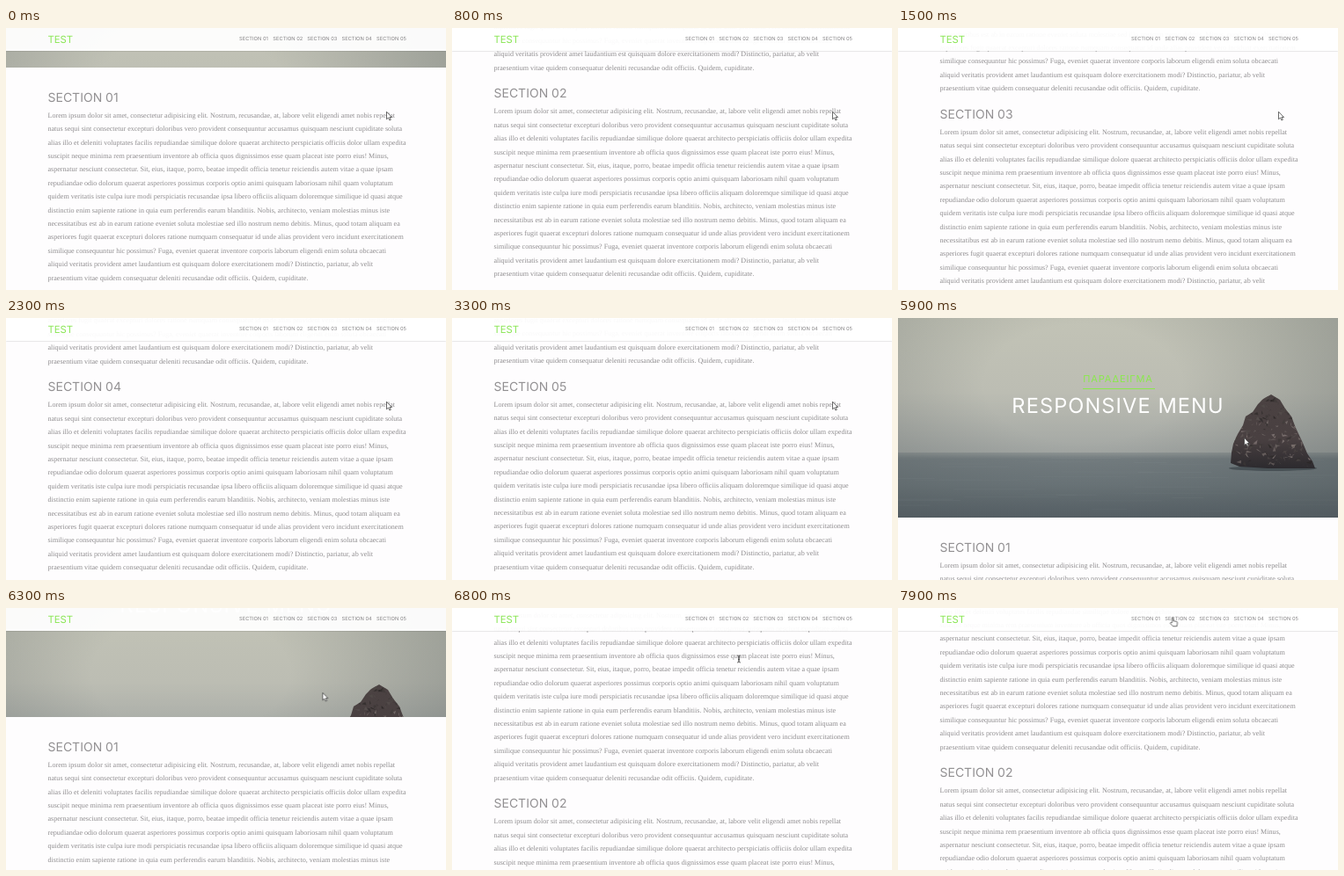
Animation of 500 by 298 pixels, one loop 8 s. Source, as an HTML page:

```html
<!DOCTYPE html>
<html lang="en">
<head>
<meta charset="utf-8">
<title>Responsive menu</title>
<style>
@property --scroll { syntax: "<number>"; inherits: true; initial-value: 182; }

html, body { margin: 0; width: 100%; height: 100%; overflow: hidden; background: #fefdfe; }
#stage {
  position: relative; width: 500px; height: 298px; overflow: hidden;
  background: #fefdfe; text-rendering: geometricPrecision;
  font-family: Inter, sans-serif;
  animation: scroll 8s infinite cubic-bezier(.3, 0, .3, 1);
}
#stage div { position: absolute; white-space: nowrap; }

#scene { left: 0; top: 0; width: 500px; height: calc(max(0, 226.7 - var(--scroll)) * 1px); overflow: hidden; }
#scene svg { display: block; }

#page { left: 0; top: 0; width: 500px; transform: translateY(calc(var(--scroll) * -1px)); }
#page .kicker, #page .title { left: 0; width: 500px; text-align: center; }
#page .kicker { top: 58.5px; font-size: 11px; line-height: 20px; letter-spacing: .9px; color: #8ae94c; }
#page .rule { left: 210px; top: 80px; width: 82px; height: 1.2px; background: #8ae94c; }
#page .title { top: 85px; font-size: 23.6px; line-height: 30px; letter-spacing: 1.1px; color: #fff; }
#page section { position: absolute; left: 47.5px; }
#page h2 { margin: 0; font-size: 14px; line-height: 20px; font-weight: 400; color: #929092; }
#page p { margin: 2px 0 0; font: 8.08px/15.4px "Liberation Serif", serif; color: #8f8d8f; white-space: pre; }

#nav {
  left: 0; top: 0; width: 500px; height: 26px; background: rgba(255, 255, 255, .95);
  box-shadow: 0 .5px 1.5px rgba(0, 0, 0, .22);
  opacity: clamp(0, (var(--scroll) - 40) / 50, 1);
}
#nav div { top: 3.4px; line-height: 20px; font-size: 5.75px; color: #858385; }
#nav .brand { left: 47.5px; font-size: 11.3px; color: #8ae655; }

#cursor { left: -8px; top: -8px; width: 16px; height: 16px; animation: move 8s infinite ease-in-out; }
#cursor svg { position: absolute; inset: 0; fill: #fff; stroke: #444; stroke-width: .8; stroke-linejoin: round; }
#arrow { animation: arrow 8s infinite step-end; }
#beam { animation: beam 8s infinite step-end; }
#hand { animation: hand 8s infinite step-end; }

@keyframes scroll {
  0%, .6% { --scroll: 182; }
  7.5%, 9.4% { --scroll: 417; }
  18.75% { --scroll: 632; }
  20% { --scroll: 633; }
  28.75%, 33% { --scroll: 886.5; }
  41.25%, 60.6% { --scroll: 1121.5; }
  70% { --scroll: 0; }
  73.75% { --scroll: 0; animation-timing-function: cubic-bezier(.4, 0, .6, .9); }
  85% { --scroll: 272.5; animation-timing-function: ease-out; }
  88% { --scroll: 289; }
  96.25% { --scroll: 289; animation-timing-function: ease-in; }
  98.75% { --scroll: 307.5; animation-timing-function: linear; }
  100% { --scroll: 334; }
}
@keyframes move {
  0%, 41.25% { transform: translate(435px, 100px); }
  43.75% { transform: translate(484px, 118px); }
  55% { transform: translate(484px, 282px); }
  57.5%, 61% { transform: translate(486px, 286px); }
  70%, 72.5% { transform: translate(399px, 146px); }
  73.75% { transform: translate(396px, 141px); }
  84%, 86% { transform: translate(326px, 58px); }
  92.5%, 100% { transform: translate(313.5px, 16px); }
}
@keyframes arrow { 0% { opacity: 1; } 81.25%, 100% { opacity: 0; } }
@keyframes beam { 0% { opacity: 0; } 81.25% { opacity: 1; } 91.25%, 100% { opacity: 0; } }
@keyframes hand { 0% { opacity: 0; } 91.25%, 100% { opacity: 1; } }
</style>
</head>
<body>
<div id="stage">
  <div id="scene">
    <svg width="500" height="298" viewBox="0 0 500 298">
      <defs>
        <linearGradient id="sky" x2="0" y2="1">
          <stop offset="0" stop-color="#c2c3b6"/>
          <stop offset=".55" stop-color="#bcbdb3"/>
          <stop offset="1" stop-color="#a2a6a3"/>
        </linearGradient>
        <linearGradient id="sea" x2="0" y2="1">
          <stop offset="0" stop-color="#8f9594"/>
          <stop offset=".05" stop-color="#747d80"/>
          <stop offset=".25" stop-color="#6d777b"/>
          <stop offset=".5" stop-color="#5a646a"/>
          <stop offset="1" stop-color="#4b565c"/>
        </linearGradient>
        <radialGradient id="vignette" cx=".42" cy=".25" r=".75">
          <stop offset=".3" stop-color="#444c4e" stop-opacity="0"/>
          <stop offset="1" stop-color="#444c4e" stop-opacity=".38"/>
        </radialGradient>
        <linearGradient id="stone" x2="0" y2="1">
          <stop offset="0" stop-color="#4b4242"/>
          <stop offset=".6" stop-color="#494041"/>
          <stop offset="1" stop-color="#2c2a2e"/>
        </linearGradient>
        <clipPath id="outline"><path id="rockPath" d="M424 87L415 92 409 98 403 107 395 112 392 122 386 132 381 143 379 153 378 165 388 169 420 171 474 171 471 163 465 154 460 142 452 125 447 112 440 103 434 93Z"/></clipPath>
      </defs>
      <rect width="500" height="154" fill="url(#sky)"/>
      <rect y="153" width="500" height="145" fill="url(#sea)"/>
      <g id="ripples" stroke="#a4aeb0"></g>
      <rect width="500" height="298" fill="url(#vignette)"/>
      <ellipse cx="426" cy="171" rx="50" ry="3" fill="#343c41" opacity=".6"/>
      <use href="#rockPath" fill="url(#stone)"/>
      <g id="facets" clip-path="url(#outline)"></g>
    </svg>
  </div>
  <div id="page">
    <div class="kicker">ΠΑΡΑΔΕΙΓΜΑ</div>
    <div class="rule"></div>
    <div class="title">RESPONSIVE MENU</div>
  </div>
  <div id="nav"><div class="brand">TEST</div></div>
  <div id="cursor">
    <svg id="arrow" viewBox="0 0 16 16"><path d="M5.5 3.2v8.6l2-1.8 1.4 3 1.4-.7-1.4-2.8h2.6z"/></svg>
    <svg id="beam" viewBox="0 0 16 16"><path d="M6 4q2 0 2 1v6q0 1-2 1M10 4q-2 0-2 1v6q0 1 2 1M7 8.5h2" fill="none"/></svg>
    <svg id="hand" viewBox="0 0 16 16"><path d="M6 8.7V4q0-1 .8-1t.8 1v2.8l3.2.5q1.3.2 1.2 1.6l-.5 3.9H7L4 9.6q-.4-1 .6-1z"/></svg>
  </div>
</div>
<script>
const lorem = `Lorem ipsum dolor sit amet, consectetur adipisicing elit. Nostrum, recusandae, at, labore velit eligendi amet nobis repellat
natus sequi sint consectetur excepturi doloribus vero provident consequuntur accusamus quisquam nesciunt cupiditate soluta
alias illo et deleniti voluptates facilis repudiandae similique dolore quaerat architecto perspiciatis officiis dolor ullam expedita
suscipit neque minima rem praesentium inventore ab officia quos dignissimos esse quam placeat iste porro eius! Minus,
aspernatur nesciunt consectetur. Sit, eius, itaque, porro, beatae impedit officia tenetur reiciendis autem vitae a quae ipsam
repudiandae odio dolorum quaerat asperiores possimus corporis optio animi quisquam laboriosam nihil quam voluptatum
quidem veritatis iste culpa iure modi perspiciatis recusandae ipsa libero officiis aliquam doloremque similique id quasi atque
distinctio enim sapiente ratione in quia eum perferendis earum blanditiis. Nobis, architecto, veniam molestias minus iste
necessitatibus est ab in earum ratione eveniet soluta molestiae sed illo nostrum nemo debitis. Minus, quod totam aliquam ea
asperiores fugit quaerat excepturi dolores ratione numquam consequatur id unde alias provident vero incidunt exercitationem
similique consequuntur hic possimus? Fuga, eveniet quaerat inventore corporis laborum eligendi enim soluta obcaecati
aliquid veritatis provident amet laudantium est quisquam dolore exercitationem modi? Distinctio, pariatur, ab velit
praesentium vitae quidem consequatur deleniti recusandae odit officiis. Quidem, cupiditate.`;

const $ = id => document.getElementById(id);
const navLeft = [265, 303.3, 342.3, 381.5, 421];

navLeft.forEach((left, i) => {
  const name = `SECTION 0${i + 1}`;
  $("page").insertAdjacentHTML("beforeend",
    `<section style="top:${251.8 + i * 234.5}px"><h2>${name}</h2><p>${lorem}</p></section>`);
  $("nav").insertAdjacentHTML("beforeend", `<div style="left:${left}px">${name}</div>`);
});

let seed = 7;
const random = (min, max) => {
  seed = (seed * 16807) % 2147483647;
  return min + (max - min) * seed / 2147483647;
};

// Rock facets: darker near the peak, paler towards the lower middle.
let facets = "";
for (let i = 0; i < 260; i++) {
  const x = random(380, 472), y = random(90, 168);
  const pale = y > 118 && y < 165 && random(0, 1) > .5;
  const tone = pale ? random(95, 150) : random(38, 90);
  const point = () => `${(x + random(-4, 4)).toFixed(1)},${(y + random(-3.5, 3.5)).toFixed(1)}`;
  facets += `<polygon points="${point()} ${point()} ${point()}" fill="rgb(${tone},${tone * .92},${tone * .9})" opacity=".75"/>`;
}
$("facets").innerHTML = facets;

let ripples = "";
for (let i = 0; i < 40; i++) {
  const x = random(-40, 460), y = random(156, 224);
  ripples += `<path d="M${x} ${y}h${random(30, 120)}" stroke-width=".7" opacity="${random(.03, .14)}"/>`;
}
$("ripples").innerHTML = ripples;
</script>
</body>
</html>
```
